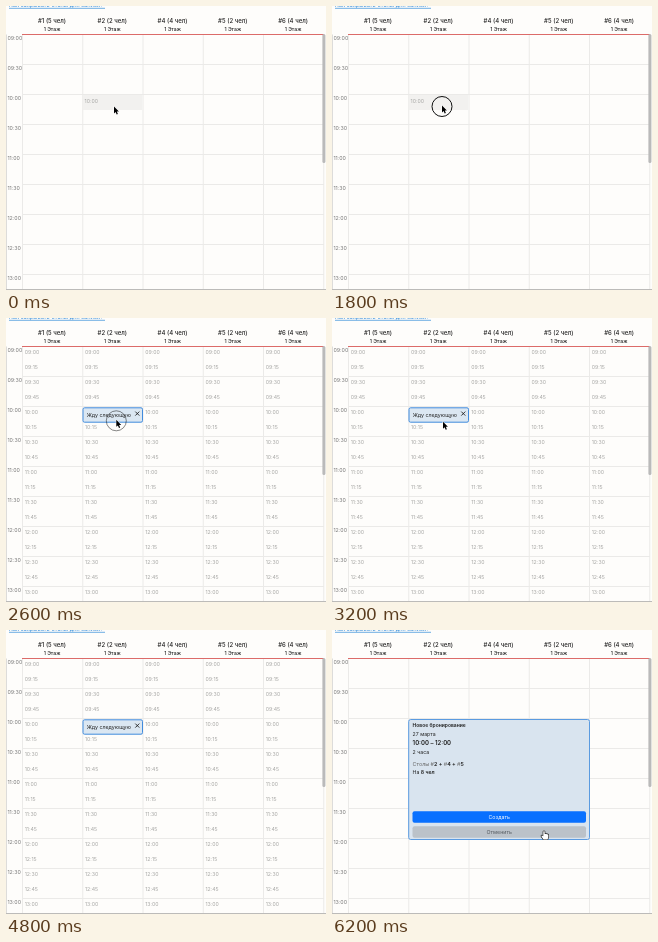
An HTML page with a canvas that plays this animation: 320 by 284 pixels, repeating every 7.2 s.

```html
<!DOCTYPE html>
<html lang="ru">
<head>
<meta charset="utf-8">
<title>Бронирование столов</title>
<style>
html, body { margin: 0; width: 100%; height: 100%; overflow: hidden; background: #fefdfb; }
canvas { display: block; width: 320px; height: 284px; }
</style>
</head>
<body>
<canvas id="stage"></canvas>
<script>
const W = 320, H = 284, LOOP = 7200, STEP = 100;
const canvas = document.getElementById('stage');
const ctx = canvas.getContext('2d');
const dpr = window.devicePixelRatio || 1;
canvas.width = W * dpr;
canvas.height = H * dpr;

const LEFT = 16.5, TOP = 28.5, COL = 60.25, ROW = 30.05;
const tables = [[1, 5], [2, 2], [4, 4], [5, 2], [6, 4]];
const colX = i => LEFT + i * COL;

// Cursor path: time, x, y
const path = [
  [0, 108, 100.5], [300, 108, 100.5], [700, 110, 99.5], [1800, 110, 99.5],
  [2100, 110.3, 101.8], [3000, 110.3, 101.8], [3200, 111, 103.7],
  [3700, 205, 167.8], [4100, 212, 201], [LOOP, 212, 201]
];

function cursorAt(t) {
  const i = path.findIndex((p, n) => n > 0 && t <= p[0]);
  const [t0, x0, y0] = path[i - 1], [t1, x1, y1] = path[i];
  const k = (t - t0) / (t1 - t0);
  return [x0 + (x1 - x0) * k, y0 + (y1 - y0) * k];
}

// Text is placed by the vertical middle of its capitals
function text(str, x, y, size, color, weight = 400, align = 'left') {
  ctx.font = `${weight} ${size}px Inter, Roboto, sans-serif`;
  ctx.textAlign = align;
  ctx.fillStyle = color;
  ctx.fillText(str, x, y + size * 0.36);
  return ctx.measureText(str).width;
}

function runs(parts, x, y, size) {
  for (const [str, weight, color] of parts) x += text(str, x, y, size, color, weight);
}

function line(x0, y0, x1, y1, color, width = 1) {
  ctx.strokeStyle = color;
  ctx.lineWidth = width;
  ctx.beginPath();
  ctx.moveTo(x0, y0);
  ctx.lineTo(x1, y1);
  ctx.stroke();
}

function box(x, y, w, h, r, fill, stroke) {
  ctx.beginPath();
  ctx.roundRect(x, y, w, h, r);
  ctx.fillStyle = fill;
  ctx.fill();
  if (stroke) {
    ctx.strokeStyle = stroke;
    ctx.lineWidth = 1;
    ctx.stroke();
  }
}

function clock(quarter) {
  const hour = 9 + Math.floor(quarter / 4);
  return `${String(hour).padStart(2, '0')}:${String(quarter % 4 * 15).padStart(2, '0')}`;
}

function drawGrid() {
  ctx.fillStyle = '#fefdfb';
  ctx.fillRect(0, 0, W, H);
  text('Как закрывать столы для записи:', 3, -0.6, 5.7, '#2b87d8');
  line(3, 2.3, 99, 2.3, '#4a9ade', 0.8);

  for (let i = 0; i < 6; i++) line(colX(i), TOP, colX(i), 283, '#ebeae8');
  for (let i = 0; i < 9; i++) {
    const y = Math.floor(TOP + i * ROW) + 0.5;
    if (i) line(LEFT, y, 318, y, '#ebeae8');
    text(clock(i * 2), 1.4, 32.3 + i * 30, 5.3, '#777');
  }
  tables.forEach(([id, seats], i) => {
    const x = colX(i) + COL / 2 - 0.6;
    text(`#${id} (${seats} чел)`, x, 14.6, 6, '#222', 500, 'center');
    text('1 Этаж', x, 23, 5.1, '#222', 500, 'center');
  });
  line(0.5, TOP, 0.5, 283, '#dddcda');
  line(0, 283.5, W, 283.5, '#bcbbb9');
  line(LEFT - 0.5, TOP, 318, TOP, '#dc6b69');
  box(316.4, 28, 3, 129, 1.5, '#bababa');
}

function drawSlots() {
  for (let c = 0; c < tables.length; c++)
    for (let q = 0; q < 17; q++)
      text(clock(q), colX(c) + 2.2, 34.6 + q * 15, 5.2, '#a5a5a3');
}

function drawHover() {
  box(77, 89, 59, 15, 0, '#f2f1ef');
  text(clock(4), 78.6, 94.7, 5.2, '#a5a5a3');
}

function drawCard() {
  box(77, 89.8, 59.5, 14.4, 1.5, '#dbe7f2', '#408bdd');
  text('Жду следующую', 80.7, 97, 5.3, '#222');
  line(129.3, 93.6, 133.3, 97.6, '#222', 0.9);
  line(133.3, 93.6, 129.3, 97.6, '#222', 0.9);
}

function drawDialog() {
  const ink = '#222', soft = '#666', x = 80.6;
  box(76.7, 89.5, 180.8, 120, 2, '#d9e4ef', '#5b9be0');
  text('Новое бронирование', x, 95.5, 5, ink, 600);
  text('27 марта', x, 104.5, 5.2, ink);
  text('10:00 – 12:00', x, 113, 6, ink, 600);
  text('2 часа', x, 121.8, 5.2, ink);
  const ids = [2, 4, 5].flatMap((id, i) => [
    [i ? ' + ' : ' ', 600, ink], ['#', 400, soft], [String(id), 600, ink]
  ]);
  runs([['Столы', 400, soft], ...ids], x, 133.7, 5.4);
  runs([['На ', 400, ink], ['8 чел', 600, ink]], x, 142.2, 5.2);
  box(80.5, 181.3, 173.5, 11.5, 2, '#0870ff');
  text('Создать', 167.2, 187, 5.3, '#fff', 400, 'center');
  box(80.5, 196.3, 173.5, 11.5, 2, '#bbc2c9');
  text('Отменить', 167.2, 202, 5.3, '#555b61', 400, 'center');
}

function drawShape(x, y, d, fill, stroke, width) {
  ctx.save();
  ctx.translate(x, y);
  const shape = new Path2D(d);
  ctx.lineJoin = 'round';
  ctx.strokeStyle = stroke;
  ctx.lineWidth = width;
  ctx.stroke(shape);
  ctx.fillStyle = fill;
  ctx.fill(shape);
  ctx.restore();
}

const drawArrow = (x, y) =>
  drawShape(x, y, 'M0 0V7L1.6 5.6L2.7 8.1L3.9 7.6L2.8 5.1H4.9Z', '#000', '#fff', 1);

const drawHand = (x, y) =>
  drawShape(x, y, 'M-.7 .6Q0 -.4 .7 .6V3L2 2.9L3.2 3.2L4.3 3.7V6L3.6 8.4H-.6L-2.6 5.3' +
    'Q-2.8 4.2 -1.8 4.5L-.7 5.3Z', '#fff', '#222', 1.3);

function drawRing(x, y, alpha) {
  ctx.globalAlpha = alpha;
  ctx.strokeStyle = '#111';
  ctx.lineWidth = 1;
  ctx.beginPath();
  ctx.arc(x, y + 1, 10, 0, Math.PI * 2);
  ctx.stroke();
  ctx.globalAlpha = 1;
}

function draw(t) {
  ctx.setTransform(dpr, 0, 0, dpr, 0, 0);
  const [x, y] = cursorAt(t);
  const dialog = t >= 4900;
  drawGrid();
  if (t < 1900) drawHover();
  else if (!dialog) {
    drawSlots();
    drawCard();
  } else drawDialog();
  if (t >= 1800 && t < 2800) drawRing(x, y, t < 2600 ? 1 : 0.5);
  if (t < 4700) drawArrow(x, y);
  else if (dialog) drawHand(x, y);
}

const start = performance.now();
function tick() {
  const t = (performance.now() - start) % LOOP;
  draw(Math.floor(t / STEP) * STEP);
  requestAnimationFrame(tick);
}
tick();
</script>
</body>
</html>
```
